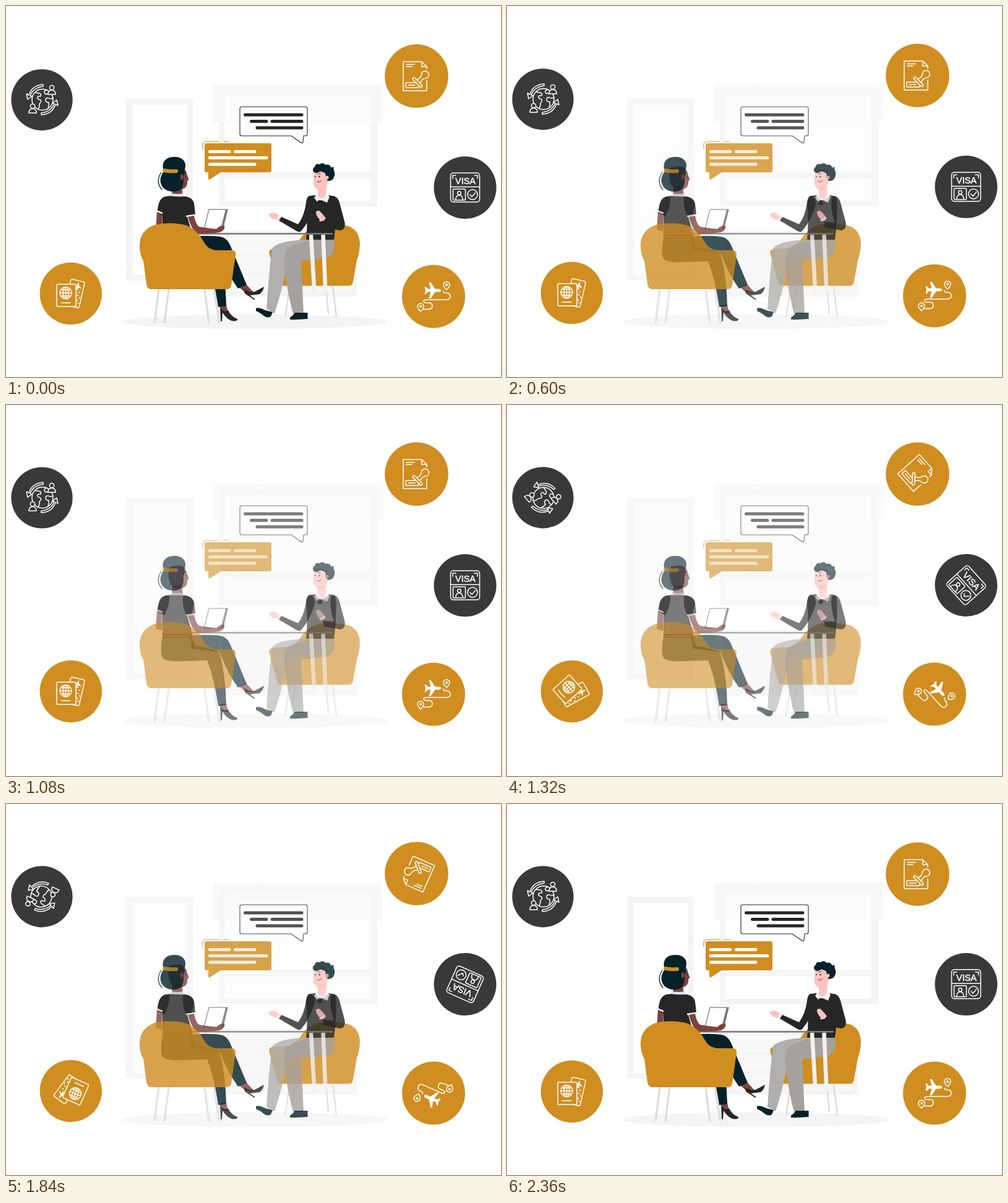
An HTML page that plays this animation: 800 px wide and 600 px high, repeating every 2400 ms.

```html
<!DOCTYPE html>
<html lang="en">
<head>
<meta charset="utf-8">
<title>Visa consultation</title>
<style>
html, body { margin: 0; width: 100%; height: 100%; overflow: hidden; background: #fff; }
svg { display: block; width: 800px; height: 600px; }
.gold { fill: #d08d20; }
.ink { fill: #262626; }
.navy { fill: #06212a; }
.skin { fill: #7d423c; }
.pink { fill: #fcc3bd; }
.white { fill: #fff; }
.wall { fill: #f4f4f4; }
.leg { fill: none; stroke: #dedede; stroke-width: 3.4; }
.line { fill: none; stroke-linecap: round; stroke-linejoin: round; }
.icon { fill: none; stroke: #fff; stroke-width: 1.5; stroke-linecap: round; stroke-linejoin: round; }
.solid { fill: #fff; stroke: none; }
.label { fill: #fff; stroke: #fff; stroke-width: .5; font: 14.5px "Liberation Sans", Arial, sans-serif; }
</style>
</head>
<body>
<svg viewBox="0 0 800 600">
  <g id="scene">
    <!-- room -->
    <path class="line" stroke="#fafafa" d="M167 111H633V423H167ZM407 111V423"/>
    <rect class="wall" x="194" y="150" width="108" height="294"/>
    <rect class="white" x="205" y="160" width="87" height="275"/>
    <rect class="wall" x="344" y="137" width="256" height="187"/>
    <rect class="white" x="353" y="146" width="236" height="169"/>
    <rect fill="#f6f6f6" x="353" y="268" width="236" height="11"/>
    <path fill="#f7f7f7" d="M335 128H608V188H589V146H353V188H335Z"/>
    <rect fill="#fbfbfb" x="353" y="146" width="236" height="42"/>
    <rect class="wall" x="350" y="364" width="217" height="106"/>
    <path fill="#f8f8f8" d="M358 375H559V401H358ZM358 406H559V431H358ZM358 436H559V462H358Z"/>
    <ellipse fill="#f4f4f4" cx="402" cy="510.500" rx="215" ry="12"/>

    <!-- speech bubbles -->
    <path class="white" stroke="#262626" stroke-width="1.1" d="M381 163H484Q487 163 487 166V207Q487 210 484 210H481L480 220Q479 223 476 220.500L461 210H381Q378 210 378 207V166Q378 163 381 163Z"/>
    <path class="line" stroke="#262626" stroke-width="5" d="M386.500 176H478M396.500 186.500H421M430 186.500H478M406 197H478"/>
    <path class="gold" d="M324 222H426Q429 222 429 225V266Q429 269 426 269H347L330 280Q327 282 327 278V269H324Q321 269 321 266V225Q321 222 324 222Z"/>
    <path class="line" stroke="#fff" stroke-width="5" d="M329.500 235.500H361M370.500 235.500H402M329.500 245.500H421M329.500 256H402"/>
    <path class="line" stroke="#d08d20" stroke-width="1.2" d="M318 231V225Q318 219 324 219H344M352 219H360"/>

    <!-- right chair -->
    <path class="leg" d="M459 453L451 503M468 453L462 490M517 453L521 498M528 453L534 503" style="stroke-width:2.600"/>
    <path class="gold" d="M425 398Q426 394 430 393L458 391Q470 386 476 376Q488 357 510 353Q540 351 556 357Q572 365 572 386Q571 401 567 411L560.500 447Q559.500 452.500 554 452.500H445Q439 452.500 438 447L427 406Z"/>

    <!-- man -->
    <path fill="#b0afad" d="M488 378Q440 379 430 392Q425 430 421 490L434 497Q445 465 456 410L512 400V378Z"/>
    <path fill="#a5a19e" d="M531 378V392Q529 405 515 408L477 412L481 498H464Q449 440 450 404Q452 388 475 384L490 378Z"/>
    <path class="navy" d="M404 488.500Q410 487 419 492L431 495L428 502Q424 505 418 502Q411 496 404 493Z"/>
    <path class="navy" d="M467 496H487.500V506Q473 507.500 459 507Q458 503 463 501Z"/>
    <path class="pink" d="M443 341Q438 335 432 334L425 336Q424 339 429 343Q435 347 441 346Z"/>
    <path class="pink" d="M504 292H518L517 308Q512 319 504 309Z"/>
    <path class="pink" d="M498 266Q506 261 519 268L521 281Q518 298 507 298Q498 296 496.500 286Z"/>
    <path class="navy" d="M498 269Q493 264 499 260Q500 254 507 256Q512 252 517 257Q523 255 526 262Q527 259 529.500 261V265Q533 271 530 277Q528 283 520 283L516 277Q518 270 513 269Q508 266 505 269Q501 271 498 269Z"/>
    <circle class="pink" cx="518.500" cy="277.500" r="3"/>
    <g class="ink"><circle cx="506.500" cy="276" r="1.2"/><circle cx="500" cy="276" r="1"/></g>
    <path class="line" stroke="#262626" stroke-width=".9" d="M504 271.500L508 271M503 284Q507 286 510 282"/>
    <path class="ink" d="M491 307L500 306Q509 322 522 306L532 308Q536 330 530 378H485Q488 350 485 318Q487 308 491 307Z"/>
    <path class="ink" d="M490 307Q500 308 499 322Q491 348 477 364Q474 367 468 363L441 347L445 341L472 353Q482 340 485 318Q486 309 490 307Z"/>
    <path class="ink" d="M526 307Q536 307 539 318L547.500 350Q549 362 540 363L514 358L512 349L530 350Q521 325 526 307Z"/>
    <path fill="#eef0f2" d="M502 305L498 310L504 318L510 314L519 318L523 308L517 305Q510 317 502 305Z"/>
    <circle class="ink" cx="507" cy="318" r="4"/>
    <path class="line" stroke="#eef0f2" stroke-width="3" d="M441 341L439 346M508 347L515 343"/>
    <path class="pink" d="M501 335Q500 331 506 331Q511 335 516 342Q516 347 511 348Q503 344 501 335Z"/>

    <!-- table -->
    <path class="line" stroke="#f2f2f2" stroke-width="6.500" d="M493 370L498.500 465M512.500 370L516.500 465" style="stroke-linecap:butt"/>
    <rect fill="#7b7d7c" x="300" y="367" width="228" height="2.600"/>

    <!-- woman -->
    <path class="skin" d="M345 484L356 483L359 497L349 495ZM377 455L388 450L401 464L386 463Z"/>
    <path class="skin" d="M253 370H299V376H253Z"/>
    <path class="navy" d="M253 374Q248 400 253 409Q259 416 290 414L325 413Q336 440 343 487L356 485Q355 440 346 403Q336 393 306 390L300 374Z"/>
    <path class="navy" d="M298 373Q334 370 350 374Q359 377 364 391L389 451L375 457Q357 432 346 401Q325 396 300 394Z"/>
    <path class="ink" d="M346 487Q352 497 359 492Q364 503 374 506Q375 510 366 509.500Q357 507 350 496L349 510H347Z"/>
    <path class="ink" d="M385 458Q394 464 402 462L417 454Q416 461 410 466L394 468L403 474L401 475L386 465Z"/>
    <path class="skin" d="M244 333L253 335L252 365L242 362Z"/>
    <path class="skin" d="M269 292H284L286 307Q277 311 268 306Z"/>
    <path class="skin" d="M264 262Q289 254 292 271L295.500 281L293 283Q294 293 286 296Q274 300 266 290Q260 276 264 262Z"/>
    <path class="ink" d="M258 308Q274 305 290 308Q302 310 304 320L300 339L293 341L302 373H253V336L245 332Q246 311 258 308Z"/>
    <path class="ink" d="M259 308Q248 310 246 324L244 334L256 340Q265 322 264 309Z"/>
    <path class="ink" d="M286 308Q301 308 304 320L306 337L292 341Q284 326 286 308Z"/>
    <path class="line" stroke="#fff" stroke-width="2.500" d="M245 332L252 335M292 340L305 338"/>
    <path fill="#dfe4ef" d="M267 303Q277 305 287 303L289 308Q276 309 264 307Z"/>
    <path class="navy" d="M254 264Q251 250 264 245Q284 241 289.500 254Q291 261 288 266H256Z"/>
    <path class="navy" d="M256 266H288Q290 270 287 277Q288 296 278 299Q264 303 254 294Q244 281 256 266Z"/>
    <path class="line" stroke="#06212a" stroke-width="1.300" d="M251 269Q241 284 252 297"/>
    <path class="skin" d="M282 273Q286 270 287 276Q286 283 282 281Z"/>
    <path class="line" stroke="#d08d20" stroke-width="6" d="M256 266Q265 268 275 267"/>
    <path class="line" stroke="#262626" stroke-width="1" d="M288 271L291 269M291 275V277"/>
    <path fill="#fff" stroke="#555" stroke-width="1" d="M328 329H358L350 361H320Z"/>
    <path fill="#777" d="M355 329H358.500L351 360H347Z"/>
    <path class="skin" d="M294 341L304 339Q306 352 312 357L340 361Q344 355 353 355Q355 362 346 366Q328 369 308 368Q299 360 294 341Z"/>

    <!-- left chair -->
    <path class="leg" d="M247 458L240 513M263 458L256 513M321 458L328 513M336 458L345 513"/>
    <path class="gold" d="M216 392Q214 364 240 354Q268 348 292 355Q309 362 320 382Q326 393 338 395H366Q372 396 371 403L364 452Q363 458 356 458H234Q228 457 227 450L222 412Q217 404 216 392Z"/>
  </g>
  <g id="badges"></g>
</svg>
<script>
const LOOP = 2400, STEP = 40, TURN = 1160, HALF = 1200, END = LOOP - STEP;
const GOLD = '#d08d20', DARK = '#393939', FADE = .45;

const path = (d, more = '') => `<path d="${d}" ${more}/>`;
const ring = (x, y, r, more = '') => `<circle cx="${x}" cy="${y}" r="${r}" ${more}/>`;
const box = (x, y, w, h, r, more = '') =>
  `<rect x="${x}" y="${y}" width="${w}" height="${h}" rx="${r}" ${more}/>`;
const person = (x, y, fill) =>
  path(`M${x - 6} ${y + 11}Q${x - 6} ${y + 4} ${x} ${y + 4}Q${x + 6} ${y + 4} ${x + 6} ${y + 11}Z`, `fill="${fill}"`) +
  ring(x, y, 3.6, `fill="${fill}"`);
const pin = (x, y) =>
  path(`M${x} ${y + 8}Q${x - 5} ${y + 3} ${x - 5} ${y}A5 5 0 0 1 ${x + 5} ${y}Q${x + 5} ${y + 3} ${x} ${y + 8}Z`) +
  ring(x, y, 2, 'class="solid"');
const plane = (x, y, size, angle) => path(
  'M14 0Q13 -2.500 9 -2.500H4L-3 -13H-6L-3 -2.500H-8L-11 -6H-13L-11.500 0L-13 6H-11L-8 2.500H-3L-6 13H-3L4 2.500H9Q13 2.500 14 0Z',
  `class="solid" transform="translate(${x} ${y}) rotate(${angle}) scale(${size})"`);

const people =
  ring(59, 151.5, 17) +
  path('M47 140L53 141Q58 142 56 146H52Q49 149 53 151Q58 152 56 156Q53 158 54 162L52 167M65 136Q60 138 63 142Q66 143 69 142M76 149Q72 151 69 149Q64 148 64 152Q64 156 69 156Q70 161 68 165') +
  path('M60 127Q42 128 37 144L33 142L35 151L42 146L39 145Q44 132 60 130Z') +
  path('M57 176Q75 175 80 159L84 161L82 152L75 157L78 158Q73 171 57 173Z') +
  person(74, 132, DARK) + person(43, 162, DARK);

const stamp =
  path('M680 121V137H642V90H672L680 98V102M672 90V98H680M647 94.500H660M647 98H656') +
  box(646, 124, 21, 8, 1) + path('M650 128H661') +
  `<g fill="${GOLD}" transform="translate(665 123.500) rotate(45)">` +
  path('M-4 -2Q-1 -8 -4 -13A6 6 0 1 1 4 -13Q1 -8 4 -2Z') + box(-10, -2, 20, 4, 1.5) + '</g>';

const visa =
  box(718.5, 270, 47, 47, 4.5) +
  path('M718.500 292.500H765.500M722 279V274H727M757 274H762V279') +
  '<text class="label" x="742.500" y="288" text-anchor="middle">VISA</text>' +
  box(722.5, 296, 20, 18, 1.5) +
  ring(732.5, 302.5, 2.8) + path('M727 313Q727 306 732.500 306Q738 306 738 313') +
  ring(754, 305, 8) + path('M750 305L753 308.500L758.500 302');

const passport =
  box(105, 441.5, 23, 43, 2.5, 'transform="rotate(13 105 442)"') +
  plane(116, 453.5, .45, -75) +
  path('M112 462H113M117 463H119M115 468H117M119 471V473M114 475L116 477M116 481H118') +
  box(82, 450, 31, 36, 1.5, `fill="${GOLD}"`) +
  ring(96.5, 464, 9.5) +
  '<ellipse cx="96.500" cy="464" rx="4.500" ry="9.500"/>' +
  path('M87 464H106M89 459H104M89 469H104M96.500 454.500V473.500M89 480H104');

const route =
  plane(689.5, 460, 1, 0) + pin(712, 451) + pin(670, 486) +
  path('M674 490.500H683Q689 490 689 485Q689 480 683 480H680Q675 480 675 477.500Q675 475 680 475H711Q718 475 718 469.500Q718 464 711 464Q706 464 707 461');

// lift: upward travel in px; back: returns during the second half
const badges = [
  { x: 58, y: 151.8, r: 49.6, fill: DARK, lift: 2, art: people },
  { x: 663.5, y: 113.4, r: 51.3, fill: GOLD, lift: 2, back: true, art: stamp },
  { x: 742, y: 293.7, r: 50.5, fill: DARK, lift: 2.2, art: visa },
  { x: 104.8, y: 465, r: 50.2, fill: GOLD, lift: 2, back: true, art: passport },
  { x: 691, y: 469.7, r: 51, fill: GOLD, lift: 2.1, art: route }
];

const scene = document.getElementById('scene');
const layer = document.getElementById('badges');
layer.innerHTML = badges.map(b =>
  `<g>${ring(b.x, b.y, b.r, `fill="${b.fill}"`)}<g class="icon">${b.art}</g></g>`).join('');

function draw(time) {
  const t = Math.floor((time % LOOP) / STEP) * STEP;
  const rise = Math.min(1, t / HALF);
  const swing = t < HALF ? rise : 1 - (t - HALF) / (END - HALF);
  const angle = Math.max(0, t - TURN) / (END - TURN) * 360;
  const alpha = 1 - FADE * swing;
  scene.setAttribute('fill-opacity', alpha);
  scene.setAttribute('stroke-opacity', alpha);
  badges.forEach((b, i) => {
    const dy = -b.lift * (b.back ? swing : rise);
    layer.children[i].setAttribute('transform', `translate(0 ${dy}) rotate(${angle} ${b.x} ${b.y})`);
  });
}

let start;
function tick(now) {
  start ??= now;
  draw(now - start);
  requestAnimationFrame(tick);
}
draw(0);
requestAnimationFrame(tick);
</script>
</body>
</html>
```
